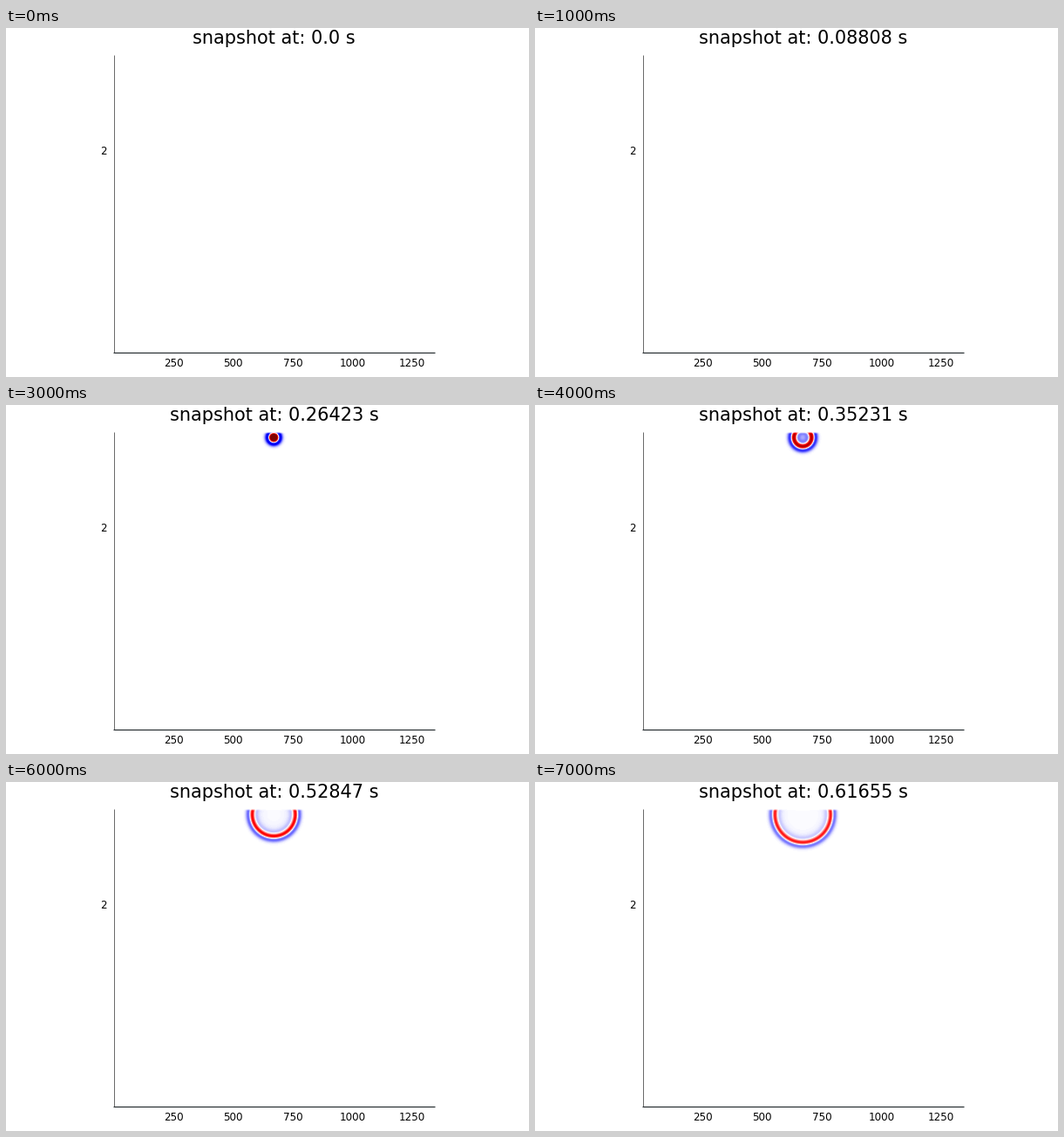
A matplotlib script for the animation above (8000 ms loop, 600 by 400 pixels).

```python
import numpy as np
import matplotlib.pyplot as plt
from matplotlib.animation import FuncAnimation
from matplotlib.colors import LinearSegmentedColormap

W, H, DPI = 600, 400, 100
LEFT, RIGHT, TOP, BOTTOM = 124, 491, 31, 371   # plot area in pixels
STEPS, STEP_MS = 8, 1000
DT = 0.088078                                  # simulated seconds per step

SHOT_X, SHOT_Y = 307.2, 37.2                   # where the wave starts
SPEED = 7.15                                   # wave speed, pixels per step
T0 = 2.357                                     # wavelet peak, in steps
SIGMA = 2.6 / SPEED                            # wavelet width, in steps
SHOT_SIZE = 2.4                                # softens the starting point
PEAK_STEP, PEAK = 5, 0.62                      # amplitude reference

plt.rcParams["font.family"] = "DejaVu Sans"
SEISMIC = LinearSegmentedColormap.from_list(
    "waves",
    [(0, 0, 0.3), (0, 0, 1), (1, 1, 1), (1, 0, 0), (0.5, 0, 0)],
    N=257,
)


def ricker(t):
    x2 = (t / SIGMA) ** 2
    return (1 - x2) * np.exp(-x2 / 2)


radii = np.linspace(0, 80, 641)
theta = np.linspace(0, 4, 1201)


def radial_wave(step):
    """Cylindrical wave from a point shot, as a function of radius."""
    r = np.hypot(radii, SHOT_SIZE)
    delay = r[:, None] * np.cosh(theta) / SPEED
    return ricker(step - T0 - delay).sum(axis=1) * (theta[1] - theta[0])


px = np.arange(LEFT, RIGHT) + 0.5
py = np.arange(TOP, BOTTOM) + 0.5
dist = np.hypot(px[None, :] - SHOT_X, py[:, None] - SHOT_Y)
surface = np.clip((py - TOP) / 2, 0, 1)[:, None]
gain = PEAK / radial_wave(PEAK_STEP).max()


def wavefield(step):
    if step < 2:
        return np.zeros_like(dist)
    wave = np.interp(dist, radii, gain * radial_wave(step), right=0)
    return wave * surface


def caption(step):
    return f"snapshot at: {round(step * DT, 5)} s"


fig = plt.figure(figsize=(W / DPI, H / DPI), dpi=DPI, facecolor="white")
ax = fig.add_axes([0, 0, 1, 1])
ax.axis("off")

image = ax.imshow(
    wavefield(0), cmap=SEISMIC, vmin=-1, vmax=1, aspect="auto",
    interpolation="nearest", extent=(LEFT, RIGHT, BOTTOM, TOP),
)
ax.set_xlim(0, W)
ax.set_ylim(H, 0)

ax.plot([123.5, 123.5], [TOP, 372], color="#6b6b6b", lw=0.72,
        solid_capstyle="butt")
ax.plot([123, 491.5], [371.5, 371.5], color="#1c2426", lw=0.8,
        solid_capstyle="butt")

TICK = 8.57
for value in range(250, 1251, 250):
    ax.text(123.5 + 0.274 * value, 387.7, str(value), fontsize=TICK,
            ha="center", va="baseline")
ax.text(116, 145.2, "2", fontsize=TICK, ha="right", va="baseline")

title = ax.text(307.8, 18, caption(0), fontsize=15,
                ha="center", va="baseline")


def update(step):
    image.set_data(wavefield(step))
    title.set_text(caption(step))
    return image, title


anim = FuncAnimation(fig, update, frames=STEPS, interval=STEP_MS,
                     repeat=True, repeat_delay=0, blit=False)
plt.show()
```
